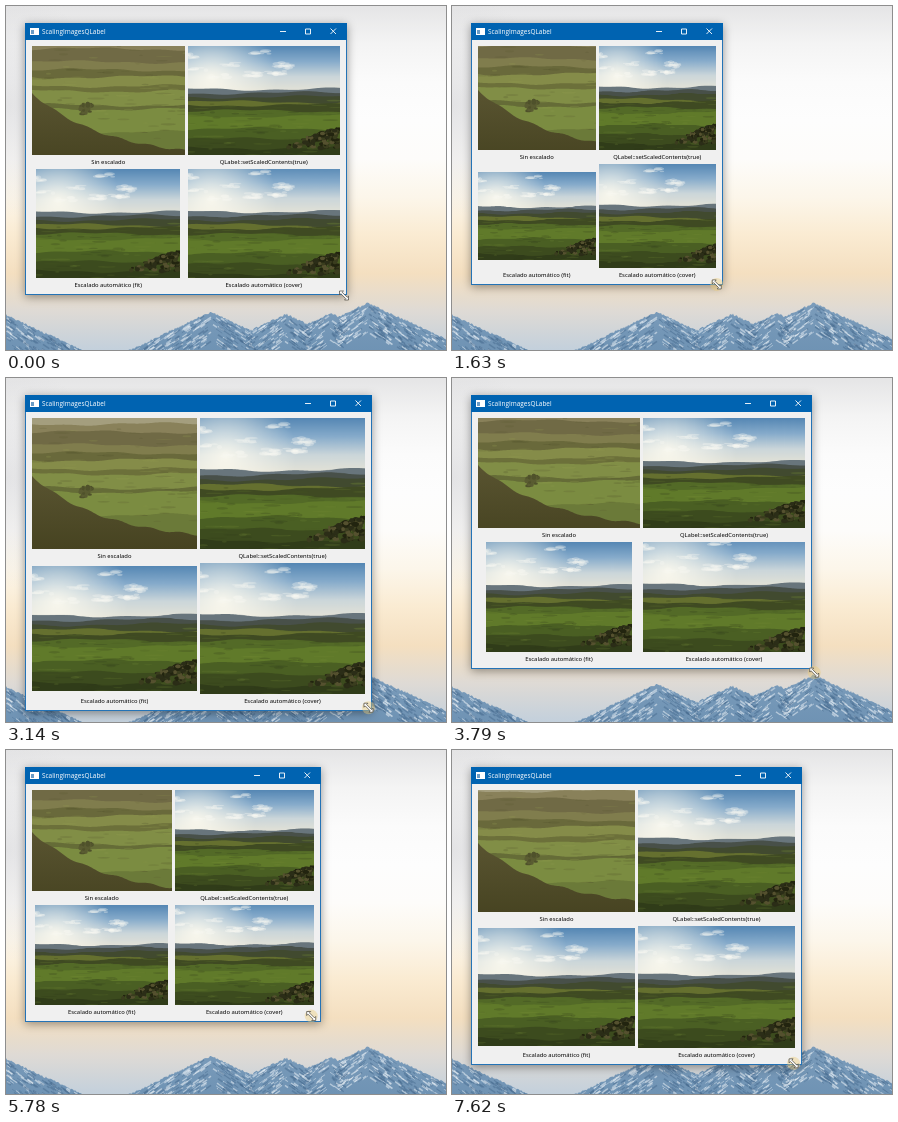
An HTML page with a canvas that plays this animation: 440 px wide and 344 px high, repeating every 7680 ms.

```html
<!DOCTYPE html>
<html lang="es">
<head>
<meta charset="utf-8">
<title>ScalingImagesQLabel</title>
<style>
  html, body { margin: 0; width: 100%; height: 100%; overflow: hidden; }
  #stage { position: relative; width: 440px; height: 344px; overflow: hidden; }
  canvas, svg { display: block; }
  #win {
    position: absolute; left: 19px; top: 17px; box-sizing: border-box;
    border: solid #2473b6; border-width: 0 1px 1px; background: #f0f0f0;
    box-shadow: 0 2px 9px rgba(0, 0, 0, .4);
  }
  #bar {
    position: relative; height: 17px; margin: 0 -1px; background: #0063b1; color: #fff;
    font: 6.45px/17px "Open Sans", "Noto Sans", sans-serif;
  }
  #bar span { position: absolute; left: 17px; white-space: nowrap; }
  #bar svg { position: absolute; top: 0; }
  #icon { left: 5px; }
  #buttons { right: 8px; }
  #grid {
    position: absolute; inset: 17px 0 0; padding: 6px 6px 2px;
    display: grid; column-gap: 3px;
    grid-template: minmax(0, 1fr) 14px minmax(0, 1fr) 14px / minmax(0, 1fr) minmax(0, 1fr);
  }
  #grid canvas { width: 100%; height: 100%; }
  .native { object-fit: none; object-position: left center; }
  .fill { object-fit: fill; }
  .fit { object-fit: contain; }
  .cover { object-fit: cover; }
  .cap {
    font: 5.85px/14px "Noto Sans", "DejaVu Sans", sans-serif;
    color: #000; text-align: center; white-space: nowrap;
  }
  #cursor { position: absolute; left: -8px; top: -8px; }
</style>
</head>
<body>
<div id="stage">
  <canvas id="wall" width="440" height="344"></canvas>
  <div id="win">
    <div id="bar">
      <svg id="icon" width="10" height="17"><path d="M0 5h9v7H0z" fill="#fff"/><path d="M1 7h3v4H1z" fill="#6a9cc6"/></svg>
      <span>ScalingImagesQLabel</span>
      <svg id="buttons" width="64" height="17" fill="none" stroke="#fff" stroke-width=".9">
        <path d="M5 8.5h6M30.5 6h5v5h-5zM55.500 5.500l5.500 5.500m0-5.500l-5.500 5.500"/>
      </svg>
    </div>
    <div id="grid">
      <canvas class="native" width="200" height="140"></canvas>
      <canvas class="valley fill" width="288" height="218"></canvas>
      <div class="cap">Sin escalado</div>
      <div class="cap">QLabel::setScaledContents(true)</div>
      <canvas class="valley fit" width="288" height="218"></canvas>
      <canvas class="valley cover" width="288" height="218"></canvas>
      <div class="cap">Escalado automático (fit)</div>
      <div class="cap">Escalado automático (cover)</div>
    </div>
  </div>
  <svg id="cursor" width="16" height="16" viewBox="-8 -8 16 16">
    <circle id="press" r="6.5" fill="#ecca76" opacity=".42"/>
    <path d="M-4.500-4.500h4l-1.300 1.300 5 5L4.500.5v4h-4l1.300-1.300-5-5L-4.500-.5z" fill="#fff" stroke="#433f38" stroke-width=".7"/>
  </svg>
</div>

<script>
  const TAU = Math.PI * 2;

  function seeded(seed) {
    return (min = 0, max = 1) => {
      seed = (seed * 16807) % 2147483647;
      return min + (max - min) * seed / 2147483647;
    };
  }

  // Vertical gradient over height h, colours evenly spaced
  function fade(c, h, colours) {
    const g = c.createLinearGradient(0, 0, 0, h);
    colours.forEach((colour, i) => g.addColorStop(i / (colours.length - 1), colour));
    return g;
  }

  function below(c, w, h, edge, fill) {
    c.fillStyle = fill;
    c.beginPath();
    c.moveTo(0, h);
    for (let x = 0; x <= w; x++) c.lineTo(x, edge(x));
    c.lineTo(w, h);
    c.fill();
  }

  // Rolling layers of land, each a sum of two waves
  function land(c, w, h, rnd, layers) {
    for (const [y, colour] of layers) {
      const p = rnd(0, TAU), q = rnd(0, TAU);
      below(c, w, h, x => y + 1.3 * Math.sin(x / 27 + p) + .6 * Math.sin(x / 8 + q), colour);
    }
  }

  function blob(c, x, y, rx, ry, colour) {
    c.fillStyle = colour;
    c.beginPath();
    c.ellipse(x, y, rx, ry, 0, 0, TAU);
    c.fill();
  }

  function glow(c, x, y, r, rgb, alpha) {
    const g = c.createRadialGradient(x, y, 0, x, y, r);
    g.addColorStop(0, `rgba(${rgb}, ${alpha})`);
    g.addColorStop(1, `rgba(${rgb}, 0)`);
    blob(c, x, y, r, r, g);
  }

  // Flat flecks that break up the fields
  function flecks(c, rnd, n, w, top, h, colours) {
    c.globalAlpha = .22;
    for (let i = 0; i < n; i++)
      blob(c, rnd(0, w), rnd(top, h), rnd(2, 9), rnd(.4, 1.1), colours[i % colours.length]);
    c.globalAlpha = 1;
  }

  function drawValley(canvas) {
    const c = canvas.getContext("2d"), rnd = seeded(77), w = 144, h = 109;
    c.scale(2, 2);
    c.fillStyle = fade(c, 46, ["#5587b4", "#86abcb", "#cbd6da", "#e5e3d6"]);
    c.fillRect(0, 0, w, h);
    glow(c, 22, 32, 62, "255, 252, 240", .85);
    for (let i = 0; i < 12; i++) {
      const x = rnd(0, 95), y = rnd(6, 30);
      for (let k = 0; k < 7; k++)
        blob(c, x + rnd(-8, 8), y + rnd(-2, 2) + k * .3, rnd(2, 6), rnd(.7, 2), "rgba(250, 248, 242, .33)");
    }
    land(c, w, h, rnd, [
      [43, "#68757c"], [47, "#485049"], [51, "#414a2f"], [56, "#65702f"], [59, "#3f4a22"],
      [65, "#536a27"], [70, "#607a2a"], [83, "#4a5f23"], [93, "#3c4b1e"], [102, "#303c19"]
    ]);
    flecks(c, rnd, 90, w, 54, h, ["#2d381a", "#748a35", "#4a5b25"]);
    for (let i = 0; i < 110; i++) {
      const x = w - 52 * rnd() * rnd(.4, 1);
      blob(c, x, rnd(100 - (x - 92) * .38, 102), rnd(1, 4), rnd(1, 2.5), ["#2b2d17", "#3a3d1e", "#22240f", "#55512f"][i % 4]);
    }
  }

  function drawNative(canvas) {
    const c = canvas.getContext("2d"), rnd = seeded(31), w = 200, h = 140;
    c.fillStyle = "#a49e7e";
    c.fillRect(0, 0, w, h);
    land(c, w, h, rnd, [
      [10, "#89815a"], [18, "#706a45"], [31, "#807d4d"], [39, "#69693b"], [46, "#858c49"],
      [55, "#6c703a"], [60, "#818e46"], [74, "#656c37"], [78, "#7b8c41"], [101, "#6b7a39"]
    ]);
    flecks(c, rnd, 110, w, 14, 110, ["#4c4e2b", "#96a052", "#5a5d33"]);
    for (let i = 0; i < 30; i++)
      blob(c, 55 + rnd(-6, 6), 78 + rnd(-5, 5), rnd(1, 3), rnd(1, 3), i % 2 ? "#4f512b" : "#5a5c32");
    below(c, w, h, x => 62 + 66 * (1 - Math.exp(-x / 75)) + Math.sin(x / 5), fade(c, h, ["#6b6440", "#57522f", "#454220"]));
  }

  function drawWall(canvas) {
    const c = canvas.getContext("2d"), rnd = seeded(5), w = 440, h = 344;
    c.fillStyle = fade(c, h, [
      "#e5e5e6", "#f4f4f4", "#fbfbfb", "#fdfdfd", "#fdfcfa",
      "#fcf6ea", "#faebd2", "#f4dfc0", "#dedad5", "#c3d0dc"
    ]);
    c.fillRect(0, 0, w, h);
    glow(c, 0, 100, 110, "190, 190, 194", .4);

    const peaks = [[0, 309], [40, 327], [205, 306], [280, 308], [325, 307], [362, 297], [395, 312]];
    const jag = Array.from({ length: w + 1 }, () => rnd(-1, 1));
    const edge = x => Math.min(...peaks.map(([px, py]) => py + .47 * Math.abs(x - px))) + jag[x];
    below(c, w, h, edge, fade(c, h, ["#9bb4cc", "#9bb4cc", "#6f93b4"]));

    // Snow on the slopes facing left, shade on the others
    for (let i = 0; i < 1100; i++) {
      const x = Math.floor(rnd(0, w)), y = edge(x) + rnd(1, 30);
      const side = edge(Math.max(0, x - 4)) > edge(Math.min(w, x + 4)) ? -1 : 1;
      const len = rnd(2, 7);
      const snow = rnd() < (side < 0 ? .62 : .35);
      c.strokeStyle = snow ? "rgba(233, 240, 246, .55)" : "rgba(72, 108, 143, .5)";
      c.lineWidth = rnd(.6, 1.8);
      c.beginPath();
      c.moveTo(x, y);
      c.lineTo(x + side * len, y + len * .7);
      c.stroke();
    }
  }

  document.querySelectorAll(".valley").forEach(drawValley);
  drawNative(document.querySelector(".native"));
  const byId = id => document.getElementById(id);
  drawWall(byId("wall"));

  const LOOP = 7680, TICK = 165, LEAD = .36;
  // Turning points of the dragged corner: tick, right, bottom
  const DRAG = [
    [0, 341, 289], [1, 341, 289], [5.5, 413, 302], [8, 384, 293], [10, 271, 279],
    [11, 262, 276], [12, 280, 277], [13, 280, 277], [15, 317, 280], [16, 368, 283],
    [19, 366, 333], [23, 360, 291], [27, 418, 325], [31, 363, 306], [34, 332, 291],
    [38, 262, 216], [40, 277, 231], [44, 382, 329], [46, 350, 315], [47, 335, 309]
  ];

  function cornerAt(tick) {
    const i = DRAG.findIndex(key => key[0] > tick);
    const [t0, x0, y0] = DRAG[i - 1], [t1, x1, y1] = DRAG[i];
    const k = (tick - t0) / (t1 - t0);
    return [x0 + (x1 - x0) * k, y0 + (y1 - y0) * k];
  }

  const win = byId("win"), cursor = byId("cursor"), press = byId("press");

  function draw() {
    const now = performance.now() % LOOP;
    const tick = Math.floor((now + 25) / TICK);
    const [right, bottom] = cornerAt(tick);
    // The window lags a little behind the pointer
    const [x, y] = cornerAt(tick + LEAD);
    win.style.width = Math.round(right) - 19 + "px";
    win.style.height = Math.round(bottom) - 17 + "px";
    cursor.style.transform = `translate(${x - 3}px, ${y + .5}px)`;
    press.style.display = tick > 1 ? "" : "none";
    requestAnimationFrame(draw);
  }
  draw();
</script>
</body>
</html>
```
